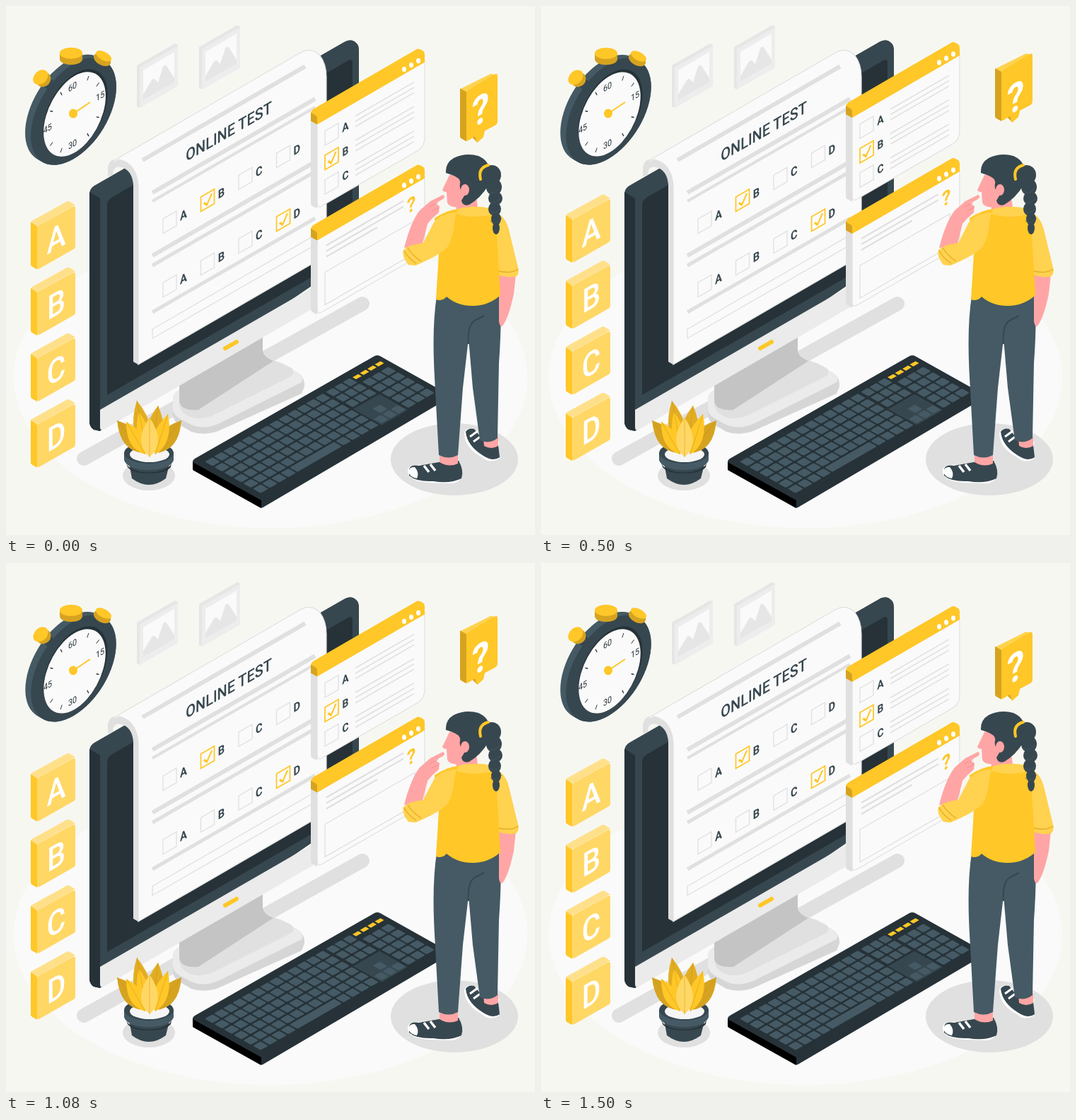
These frames come from a looping animation (748 px wide and 748 px high, 1.54 s). An HTML page:

```html
<!DOCTYPE html>
<html lang="en">
<head>
<meta charset="utf-8">
<title>Online test</title>
<style>
html, body { margin: 0; height: 100%; overflow: hidden; background: #f7f7f2; }
svg { display: block; width: 100%; height: 100%; }
text { font-family: Roboto, Inter, sans-serif; text-anchor: middle; }
</style>
</head>
<body>
<svg id="stage" viewBox="0 0 748 748"></svg>
<script>
const GOLD = '#ffc727', AMBER = '#d6a320', PALE = '#ffd765', LINE = '#e0e0e0', PAPER = '#fafafa';
const INK = '#263238', DARK = '#37474f', SLATE = '#455a64', SKIN = '#ffa5a5', SLEEVE = '#ffd24f';

const path = (d, fill, more = '') => `<path d="${d}" fill="${fill}" ${more}/>`;
const stroke = (d, color, width, more = '') =>
  path(d, 'none', `stroke="${color}" stroke-width="${width}" ${more}`);
const round = 'stroke-linecap="round" stroke-linejoin="round"';
const oval = (x, y, rx, ry, fill, more = '') =>
  `<ellipse cx="${x}" cy="${y}" rx="${rx}" ry="${ry}" fill="${fill}" ${more}/>`;
const times = (n, draw) => Array.from({ length: n }, (_, i) => draw(i)).join('');
const move = (x, y, body) => `<g transform="translate(${x} ${y})">${body}</g>`;

// Everything on an upright face rises to the right at 30 degrees.
const iso = (x, y, body) => `<g transform="matrix(.866 -.5 0 1 ${x} ${y})">${body}</g>`;
const label = (x, y, text, size, fill = DARK, weight = 500) =>
  iso(x, y, `<text y="${size * .355}" font-size="${size}" font-weight="${weight}" fill="${fill}">${text}</text>`);
const rule = (x, y, end, width, color = LINE) =>
  stroke(`M${x} ${y}L${end} ${y - (end - x) * .577}`, color, width);
const checkbox = (x, y, on) => iso(x, y,
  `<rect width="22" height="20.5" fill="none" stroke="${on ? GOLD : LINE}" stroke-width="${on ? 2 : 1.5}"/>` +
  (on ? stroke('M5 11l5 5 8-12', GOLD, 2.8) : ''));

const picture =
  path('M185 84L239 53 243 55V113L189 144 185 142Z', '#e6e6e6') +
  path('M189 87L243 56V113L189 144Z', '#ededed') +
  path('M194 91L238 65V108L194 133Z', PAPER) +
  path('M194 125L206 105Q209 101 212 105L215 108 222 86Q225 81 228 86L238 102V108L194 133Z', '#e6e6e6');

function watch() {
  const disc = (x, y, rx, ry, fill) => iso(x, y, oval(0, 0, rx, ry, fill));
  const tick = i => {
    const a = i * Math.PI / 6, x = Math.sin(a), y = -Math.cos(a);
    return i % 3 ? stroke(`M${x * 41} ${y * 43}L${x * 46} ${y * 49}`, INK, 1.2) : '';
  };
  const digits = [['60', 94, 114], ['15', 133, 127], ['30', 94, 195], ['45', 59, 173]];
  return path('M83 74H101V94H83Z', DARK) +
    times(9, i => disc(87.5 + i, 144.4 + i * .57, 69.5, 67, SLATE)) +
    disc(95.5, 149, 69.5, 67, DARK) +
    disc(98, 150.5, 52.5, 55, INK) +
    disc(97, 153, 50.5, 54, PAPER) +
    iso(97, 153, times(12, tick)) +
    digits.map(([s, x, y]) => label(x, y, s, 12.5, INK, 400)).join('') +
    stroke('M95 152L119 136', GOLD, 2) + oval(95, 152, 6, 6.5, GOLD) +
    stroke('M56 106L66 115', DARK, 14) + stroke('M137 78L133 88', DARK, 16) +
    oval(53, 104, 11, 10, AMBER, 'transform="rotate(-45 53 104)"') +
    oval(49, 101, 12, 9, GOLD, 'transform="rotate(-45 49 101)"') +
    oval(136, 76, 13, 8, AMBER, 'transform="rotate(28 136 76)"') +
    oval(138, 71, 12, 6, GOLD, 'transform="rotate(28 138 71)"') +
    path('M76 67V75C76 86 108 86 108 75V67Z', AMBER) + oval(92, 67, 16, 8, GOLD);
}

const tile = (letter, i) => move(0, i * 93.4,
  path('M35 307Q35 305 37 304L86 277Q88 276 90 277L98 282 44 312Z', '#ffe08a') +
  path('M35 306L44 312V373L37 369Q35 368 35 366Z', GOLD) +
  path('M44 314Q44 312 46 311L95 284Q98 283 98 286V340Q98 343 96 344L47 372Q44 373 44 370Z', PALE) +
  label(71, 328, letter, 47, '#fff'));

const monitor =
  // stand
  path('M236 556Q236 548 246 542L345 485 378 503 408 516Q423 523 422 538L418 548 300 601Q280 608 262 602L245 592Q236 586 236 578Z', '#d6d6d6') +
  path('M236 556Q236 548 246 542L345 485 378 503 406 515Q423 523 418 532L302 590Q280 600 262 592L245 583Q236 577 236 570Z', '#ebebeb') +
  path('M245 536L362 468V486Q364 497 390 505L404 512Q411 520 400 525L290 580Q268 588 252 576 245 571 245 560Z', '#e0e0e0') +
  path('M245 536L363 468V488Q364 496 378 502L272 571Q246 573 245 558Z', '#c4c4c4') +
  // case and screen
  path('M118 266Q118 258 125 254L478 51Q488 45 495 52 499 55 499 62V350L133 601 124 599Q118 595 118 588Z', DARK) +
  path('M118 263L133 272V601L124 599Q118 595 118 588Z', INK) +
  path('M143 282Q143 275 149 271L484 77Q490 74 490 81V350L143 550Z', INK) +
  path('M133 571L499 360V390L138 599Q133 601 133 595Z', '#ebebeb') +
  stroke('M310 484L326 475', GOLD, 6, round);

const paper =
  path('M144 241V230Q145 215 160 217 184 222 187 254V507L180 503V252Q178 232 163 228 151 225 151 239Z', LINE) +
  path('M151 222Q153 218 157 216L418 65Q432 58 444 70 453 82 453 100V353L187 507V254Q184 222 160 217Z', PAPER, `stroke="${LINE}" stroke-width="1.2"`) +
  rule(193, 218, 423, 6) +
  label(315, 177, 'ONLINE TEST', 23, DARK, 500) +
  [[264, 6], [276, 4], [353, 6], [367, 5], [433, 5]].map(([y, w]) => rule(207, y, 437, w)).join('') +
  stroke('M207 457L437 324V338L207 470Z', LINE, 1.3) +
  [[301, 1], [391, 3]].map(([y, marked]) => times(4, i =>
    checkbox(222 + i * 53.5, y - i * 31, i === marked) +
    label(251 + i * 53.4, y - 6 - i * 30.8, 'ABCD'[i], 17, DARK, 700))).join('');

function panel(base, body) {
  const bottom = base - 88;
  return path(`M431 160L440 167V${base}L433 ${base - 4}Q431 ${base - 5} 431 ${base - 8}Z`, LINE) +
    path(`M440 167L592 79V${bottom - 12}Q592 ${bottom - 2} 584 ${bottom + 5}L447 ${base - 4}Q440 ${base} 440 ${base - 8}Z`, PAPER, `stroke="${LINE}" stroke-width="1.2"`) +
    path('M431 153Q431 149 435 146L580 62Q583 60 586 62L590 64Q592 66 592 69V80L440 168 431 163Z', GOLD) +
    path('M431 151L439 156Q440 158 440 160V168L431 163Z', AMBER) +
    times(3, i => oval(563 + i * 10, 90 - i * 6, 3, 3.7, '#fff')) + body;
}
const choices = panel(287, times(3, i => {
  const y = i * 34.5;
  return checkbox(451, 177 + y, i === 1) + label(480, 171 + y, 'ABC'[i], 16, DARK, 700) +
    times(3, k => rule(494, 156 + y + k * 7.5, 577, 1.6));
}));
const question = move(0, 164, panel(273,
  times(3, i => rule(453, 175 + i * 8, i < 2 ? 562 : 525, 2.2)) +
  label(573, 117, '?', 29, GOLD, 700) +
  stroke('M451 213L578 140V186L451 259Z', LINE, 1.3)));

function keyboard() {
  const key = (u, v, w = 11) => `<rect x="${u}" y="${v}" width="${w}" height="11" rx="1.5" fill="${SLATE}"/>`;
  let keys = '';
  for (let row = 0; row < 6; row++) {
    const v = 9 + row * 13.6;
    for (let col = 0; col < 13; col++) {
      if (row < 5 || col < 4 || col > 8) keys += key(8 + col * 13, v);
    }
    if (row === 5) keys += key(60, v, 63);
    for (let col = 0; col < 3; col++) {
      if (row < 3 || row === 5 || row === 4 && col === 1) keys += key(179 + col * 12, v, 10);
      if (row) keys += key(217 + col * 13, v);
    }
  }
  const lights = times(4, i => `<rect x="${216 + i * 10.5}" y="10" width="8" height="5" fill="${GOLD}"/>`);
  return path('M264 644Q264 642 267 640L521 495Q525 493 529 495L620 546V558L365 708Q361 711 357 708L264 656Z', INK) +
    path('M264 645L361 699V710L266 657Q264 656 264 653Z', '#000') +
    `<g transform="matrix(1 -.577 1 .5625 264 644)"><rect x="177" y="50" width="37" height="40" fill="${DARK}"/>${keys}${lights}</g>`;
}

function plant() {
  const leaf = (x, y, bx, by, w, fill) => {
    const dx = bx - x, dy = by - y, len = Math.hypot(dx, dy);
    const nx = -dy / len * w, ny = dx / len * w;
    const mx = x + dx * .62, my = y + dy * .62;
    return path(`M${x} ${y}Q${mx + nx * 2} ${my + ny * 2} ${bx} ${by}Q${mx - nx * 2} ${my - ny * 2} ${x} ${y}Z`, fill) +
      stroke(`M${x} ${y}L${bx} ${by}`, '#b98a14', .7, 'opacity=".55"');
  };
  const leaves = [
    [157, 586, 194, 632, 12, AMBER], [248, 586, 212, 632, 12, AMBER],
    [185, 558, 199, 630, 12, '#e2ad22'], [215, 565, 207, 630, 12, '#e2ad22'],
    [170, 588, 197, 634, 10, GOLD], [229, 577, 211, 634, 10, GOLD],
    [188, 574, 200, 634, 9, GOLD], [203, 582, 203, 638, 12, PALE]
  ];
  return oval(202, 664, 37, 21, LINE) +
    path('M173 640L178 668Q202 686 226 668L233 640Z', DARK) +
    path('M167 631V642C172 661 232 661 237 642V631Z', SLATE) +
    path('M170 647C178 664 226 664 234 647L233 652C224 664 180 664 172 652Z', INK) +
    oval(202, 632, 35, 15, DARK) + oval(203, 634, 28, 11, '#f5f5f5') +
    leaves.map(l => leaf(...l)).join('');
}

const person =
  // shoes and ankles
  path('M648 606Q648 597 659 597L676 611 697 616V640Q684 648 673 638 650 626 648 606Z', '#fff') +
  path('M650 602Q654 596 662 598L675 614 696 620 698 638Q689 645 675 636 652 622 650 602Z', DARK) +
  stroke('M656 609L667 601M661 616L672 608', '#fff', 3) +
  path('M675 609H696V622Q686 628 676 622Z', SKIN) +
  path('M568 657Q568 651 577 649L640 648 645 662Q643 673 632 675L602 674Q570 673 568 659Z', '#fff') +
  path('M570 655Q572 648 584 650L612 645 640 643Q648 657 644 668 628 676 604 672 580 673 570 664Z', DARK) +
  path('M569 659Q570 651 578 652 585 660 581 668 572 667 569 659Z', '#fff') +
  stroke('M591 650L598 659M600 648L607 657', '#fff', 3.5) +
  path('M613 632H639V647Q626 653 613 645Z', SKIN) +
  // trousers
  path('M609 410Q650 400 699 410 701 450 697 505L695 611Q684 620 670 614L660 540 654 470 646 540 639 635Q626 642 612 635L606 525Q602 455 609 410Z', SLATE) +
  stroke('M654 478Q652 450 664 444L676 438', DARK, 2) +
  // far arm
  path('M697 378L721 379 718 407Q711 440 703 451 699 457 697 446Z', SKIN) +
  path('M684 290Q705 292 711 316L725 374Q724 383 718 383 704 384 693 379L690 330Z', SLEEVE) +
  stroke('M697 375Q714 379 724 372', '#e2ad22', 1.3) +
  // torso
  path('M636 274L665 270 668 292 650 300 637 291Z', SKIN) +
  path('M606 300Q622 289 639 287 662 294 684 287 695 294 694 325L699 409Q682 424 660 424 638 424 623 411 617 418 608 415L612 350Z', GOLD) +
  path('M639 287Q660 281 686 286L690 294Q662 302 637 294Z', SLEEVE) +
  // near arm
  path('M563 342Q572 306 585 289L600 276 618 267Q622 269 618 273L607 279 613 283 612 292Q603 299 596 308L588 340Z', SKIN) +
  stroke('M599 284L611 278M602 290L612 285', '#f28f8f', 1) +
  path('M637 292Q615 293 605 306L590 335Q570 337 562 345 559 354 569 366L579 367Q616 351 625 340 633 326 634 305Z', SLEEVE) +
  stroke('M563 346Q568 356 580 364M568 342Q574 352 587 361', '#e2ad22', 1.3) +
  // head
  path('M627 239L617 260Q618 263 623 263L624 278Q627 286 643 284L660 276 662 235Z', SKIN) +
  path('M622 236Q621 222 633 215 650 207 668 212 682 218 684 232L683 252Q672 271 655 281 646 284 644 275L650 265Q640 262 642 251 644 244 631 239Z', DARK) +
  oval(649, 260, 6, 8, SKIN) +
  [[687, 239, 13, 14], [690, 256, 11, 12], [692, 272, 10, 10], [691, 287, 9, 10], [693, 301, 7, 9], [693, 314, 5, 9]]
    .map(e => oval(...e, DARK)).join('') +
  times(4, i => stroke(`M${682 + i} ${262 + i * 14}q7 6 16 -4`, SLATE, .8)) +
  stroke('M682 225Q667 229 671 245', GOLD, 4, round);

const bubble =
  path('M656 184L667 176V195L658 186Z', AMBER) +
  path('M642 119L686 97 694 100 651 124Z', '#ffd34f') +
  path('M642 118L651 123V193L644 189Q642 188 642 186Z', AMBER) +
  path('M651 125Q651 122 653 121L691 98Q695 96 695 101V164Q695 168 692 170L677 178 675 187 666 195 663 186 653 192Q651 193 651 189Z', GOLD);

const stage = document.getElementById('stage');
stage.innerHTML =
  oval(374, 525, 363, 213, PAPER) + picture + move(88, -26, picture) +
  stroke('M110 640L504 421', LINE, 20, round) +
  oval(634, 641, 90, 51, LINE) +
  `<g id="watch">${watch()}</g>` +
  `<g data-lift="14.3">${[...'ABCD'].map(tile).join('')}</g>` +
  monitor + paper +
  `<g data-lift="14.3">${choices}${question}</g>` +
  keyboard() + plant() + person +
  `<g data-lift="43">${bubble}</g>` +
  `<g data-lift="26">${label(671, 147, '?', 57, '#fff', 700)}</g>`;

const LOOP = 1540, STEP = 1000 / 24;
const watchGroup = document.getElementById('watch');
const floats = document.querySelectorAll('[data-lift]');

function draw() {
  const time = Math.floor((performance.now() % LOOP + 4) / STEP) * STEP;
  const rise = 1 - Math.abs(Math.min(time + 25, 1500) / 750 - 1);
  const beat = time + 35;
  const scale = 1 + (beat < 1070 ? .1 * Math.sin(Math.PI * beat / 535) ** 2 : 0);
  floats.forEach(g => g.setAttribute('transform', `translate(0 ${-rise * g.dataset.lift})`));
  watchGroup.setAttribute('transform', `translate(92 142) scale(${scale}) translate(-92 -142)`);
  requestAnimationFrame(draw);
}
draw();
</script>
</body>
</html>
```
